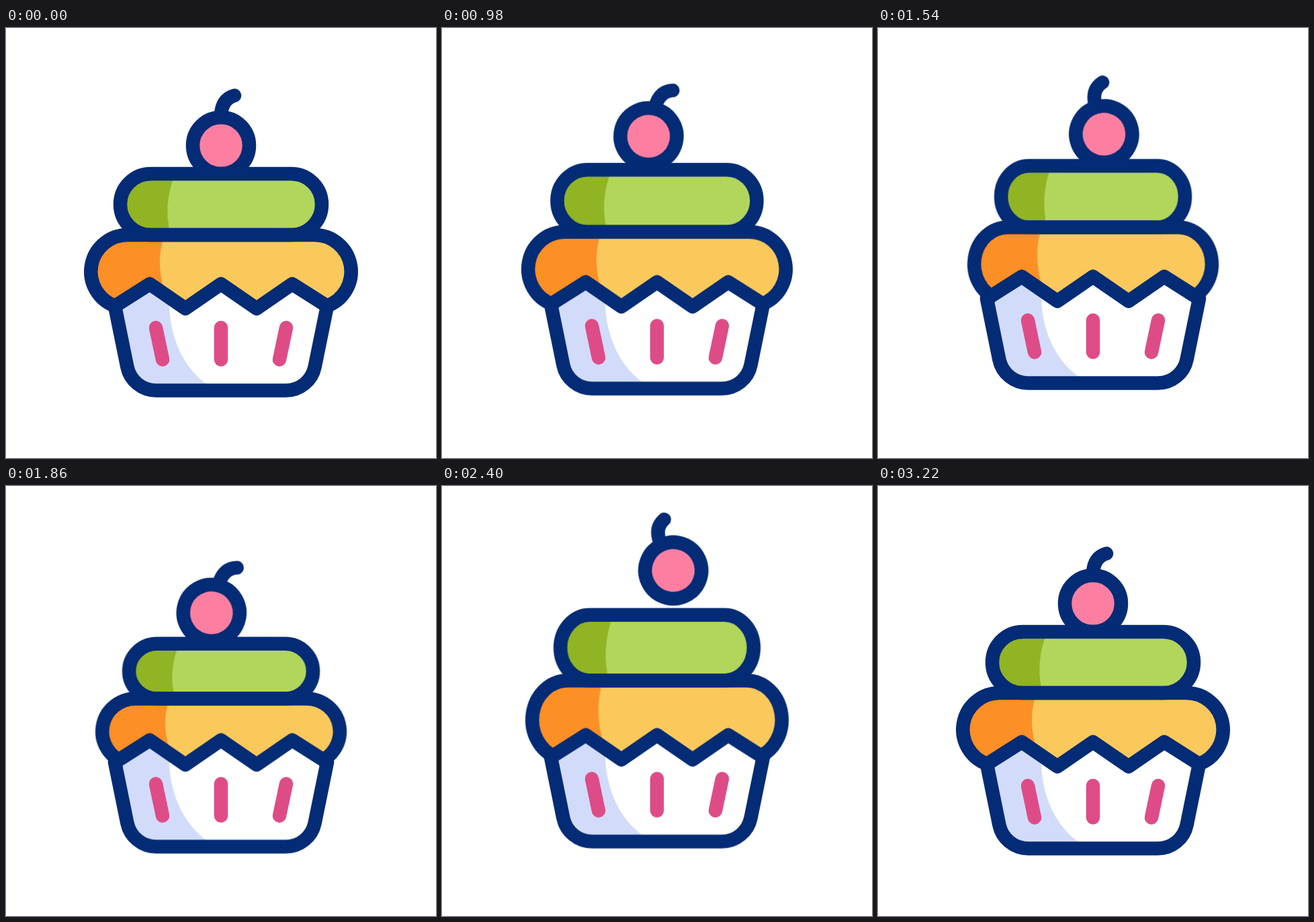
These frames come from a looping animation (640x640 px, 3.6 s). An HTML page:

```html
<!DOCTYPE html>
<html lang="en">
<head>
<meta charset="utf-8">
<title>Cupcake</title>
<style>
  html, body { margin: 0; width: 100%; height: 100%; overflow: hidden; background: #fff; }
  svg { display: block; width: 100%; height: 100%; }

  .line {
    fill: none; stroke: #042b75; stroke-width: 20.5;
    stroke-linecap: round; stroke-linejoin: round;
    vector-effect: non-scaling-stroke;
  }
  .sprinkles { fill: none; stroke: #de4c87; stroke-width: 20.5; stroke-linecap: round; }

  .lift, .tall, .slim, .hop, .tilt {
    animation: 3600ms cubic-bezier(.333, 0, .667, 1) infinite;
  }
  .tall, .slim { transform-origin: 320px 417px; }
  .tilt { transform-origin: 320px 118px; }
  .lift { animation-name: lift; }
  .tall { animation-name: tall; }
  .slim { animation-name: slim; }
  .hop  { animation-name: hop; }
  .tilt { animation-name: tilt; }

  /* whole cake leaves the ground twice */
  @keyframes lift {
    0%      { transform: translateY(0); }
    20.56%  { transform: translateY(0); animation-timing-function: cubic-bezier(.75, 0, .6, 1); }
    35.83%  { transform: translateY(-16px); animation-timing-function: cubic-bezier(.333, 0, .667, .333); }
    48.33%  { transform: translateY(0); animation-timing-function: cubic-bezier(.333, .2, .667, 1); }
    62.5%   { transform: translateY(-12px); }
    80.56%, 100% { transform: translateY(0); }
  }
  /* layers stretch in the air and squash on landing */
  @keyframes tall {
    0%      { transform: scaleY(1); }
    20.56%  { transform: scaleY(1); animation-timing-function: cubic-bezier(.75, 0, .6, 1); }
    36.39%  { transform: scaleY(1.1); }
    50%     { transform: scaleY(.89); }
    63.89%  { transform: scaleY(1.08); }
    80.56%, 100% { transform: scaleY(1); }
  }
  @keyframes slim {
    0%      { transform: scaleX(1); }
    20.56%  { transform: scaleX(1); animation-timing-function: cubic-bezier(.75, 0, .6, 1); }
    38.89%, 51.67% { transform: scaleX(.913); }
    80.56%, 100% { transform: scaleX(1); }
  }
  @keyframes hop {
    0%, 6.11% { transform: translateY(0); }
    13.06%  { transform: translateY(-47px); }
    20%     { transform: translateY(0); }
    20.56%  { transform: translateY(0); animation-timing-function: cubic-bezier(.65, 0, .6, 1); }
    35.83%  { transform: translateY(-54px); }
    49.31%  { transform: translateY(21px); }
    63.61%  { transform: translateY(-52px); }
    75%     { transform: translateY(-7px); }
    82.22%  { transform: translateY(-48px); }
    89.44%, 100% { transform: translateY(0); }
  }
  @keyframes tilt {
    0%      { transform: rotate(0deg); }
    6.11%   { transform: rotate(0deg); animation-timing-function: cubic-bezier(.333, .667, .667, 1); }
    20%, 25.28% { transform: rotate(15deg); }
    38.89%  { transform: rotate(-25deg); }
    52.22%  { transform: rotate(14.6deg); }
    66.67%  { transform: rotate(-25.2deg); }
    77.78%  { transform: rotate(14deg); }
    89.44%, 100% { transform: rotate(0deg); }
  }
</style>
</head>
<body>
<svg viewBox="0 0 640 640" role="img" aria-label="Bouncing cupcake">
  <defs>
    <path id="cup" d="M162 414L214 381 267 417.5 320 381 373 417.5 426 381 478 414 459.6 504.4A44 44 0 0 1 416.5 539.5H223.5A44 44 0 0 1 180.4 504.4Z"/>
  </defs>

  <g class="hop"><g class="tilt">
    <path class="line" d="M320 129C321 113 328 104 340 100.5"/>
    <circle cx="320" cy="175" r="42" fill="#fc7fa1"/>
    <circle class="line" cx="320" cy="175" r="42"/>
  </g></g>

  <g class="lift">
    <g class="tall"><g class="slim">
      <rect x="170" y="217" width="300" height="91" rx="45.5" fill="#b2d65c"/>
      <path fill="#91b424" d="M215.5 217H252Q233 262 245 308H215.5A45.5 45.5 0 0 1 215.5 217Z"/>
      <path fill="#fbc85c" d="M163 414A54.5 54.5 0 0 1 181 308H459A54.5 54.5 0 0 1 477 414Z"/>
      <path fill="#fc8f25" d="M163 414A54.5 54.5 0 0 1 181 308H236Q220 352 240 404V414Z"/>
      <rect class="line" x="170" y="217" width="300" height="91" rx="45.5"/>
      <path class="line" d="M163 414A54.5 54.5 0 0 1 181 308H459A54.5 54.5 0 0 1 477 414"/>
    </g></g>

    <use href="#cup" fill="#fff"/>
    <path fill="#d2dcfa" d="M162 414L214 381 243 401C241 455 262 505 300 531V539.5H223.5A44 44 0 0 1 180.4 504.4Z"/>
    <path class="sprinkles" d="M223 446L233 493.5M320 446V493.5M417 446L407 493.5"/>
    <use class="line" href="#cup"/>
  </g>
</svg>
</body>
</html>
```
